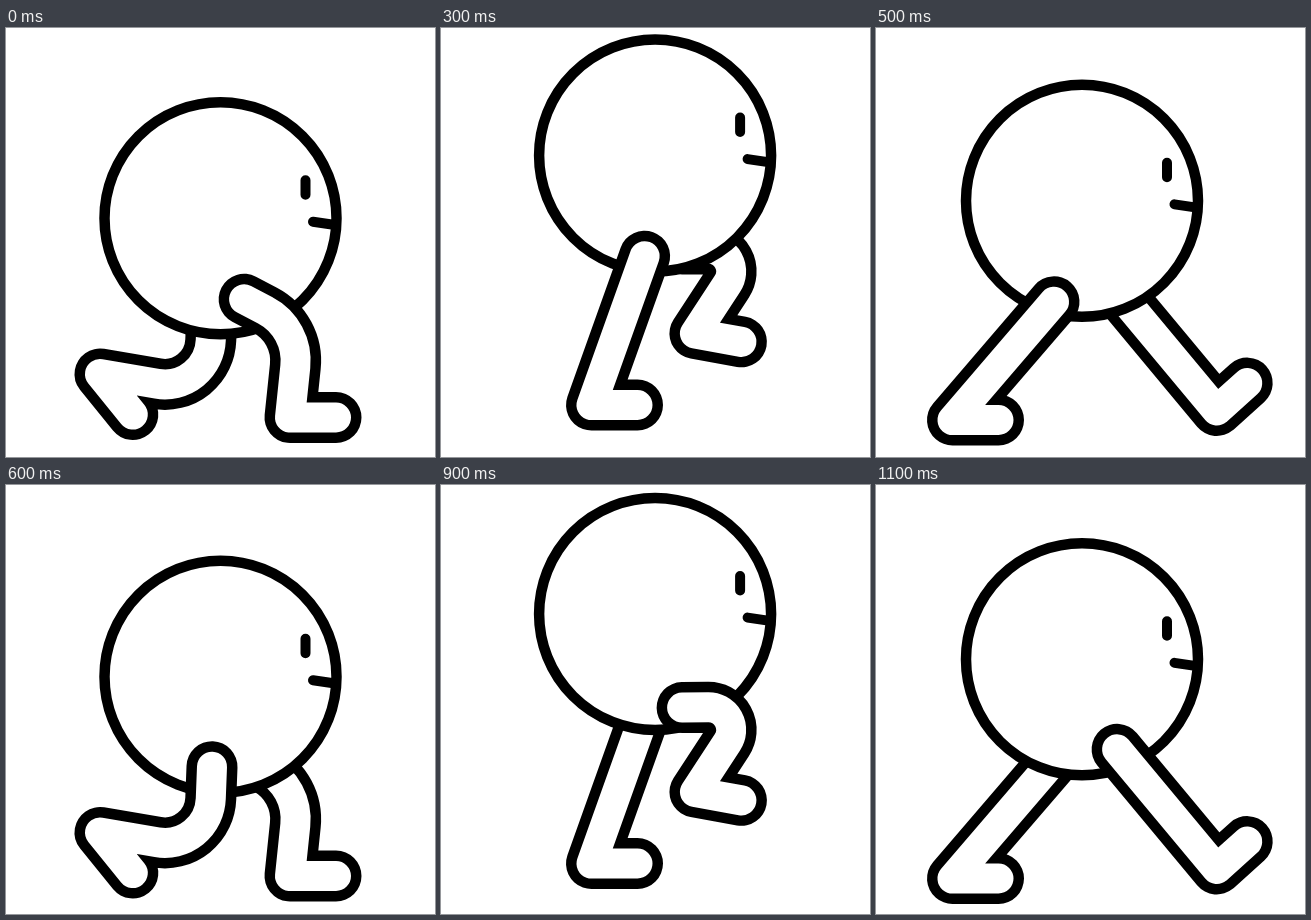
An HTML page with a canvas that plays this animation: 429x429 px, repeating every 1.2 s.

```html
<!DOCTYPE html>
<html lang="en">
<head>
<meta charset="utf-8">
<title>Walking ball</title>
<style>
  html, body { margin: 0; width: 100%; height: 100%; overflow: hidden; background: #fff; }
  canvas { display: block; }
</style>
</head>
<body>
<canvas id="stage" width="429" height="429"></canvas>
<script>
const ctx = document.getElementById('stage').getContext('2d');
const STEP = 100, STEPS = 12, HALF = STEPS / 2;
const RAD = Math.PI / 180;
const { sin, cos, tan, tanh, atan2, hypot, min, max } = Math;

// a + b*t + c*t^2 + ...
const poly = (t, ...coefs) => coefs.reduceRight((sum, c) => sum * t + c, 0);

// The body falls and rebounds once per stride, then leans back at the end
const bodyAt = t => ({
  x: 214.5 - 8.5 * (t / 5) ** 6,
  y: 126.8 + 8.7 * (t - 2.7) ** 2,
});

// Foot flat on the ground, sliding back; the leg straightens
const stance = t => ({
  hip: { x: 209 + 31 * cos(40 * RAD * (t - 0.5)), y: bodyAt(t).y + 91 + 10 * tanh(2 * (t - 2)) },
  heel: { x: poly(t, 284, -49, 1.5), y: 375.5 + 0.5 * t + 14 * (t / 2.5 - 1) ** 6 },
  tilt: 0,
  bend: poly(t, 41, 42, -20),
  split: 0.37 + 0.06 * t,
});

// Foot lifted and thrown forward
const swing = t => ({
  hip: { x: 206 + 38 * sin(22.5 * RAD * t), y: bodyAt(t).y + 90 - 6 * sin(72 * RAD * t) },
  heel: { x: poly(t, 94, 30.6, 13.3, -1.91), y: poly(t, 346, -70.2, 24, -1.7) },
  tilt: poly(t, 51, 56.9, -36.1, 4.2),
  bend: poly(t, 71, 35, -12),
  split: max(0.1, 0.35 - 0.08 * t),
});

function stroke(color, width) {
  ctx.strokeStyle = color;
  ctx.lineWidth = width;
  ctx.stroke();
}

function drawLeg({ hip, heel, tilt, bend, split }) {
  const dx = heel.x - hip.x, dy = heel.y - hip.y, reach = hypot(dx, dy);
  // The knee stands off the hip-heel line by the bend
  const out = max(0, bend), along = split * reach;
  const kneeX = hip.x + dx * split + dy / reach * out;
  const kneeY = hip.y + dy * split - dx / reach * out;
  // Its curve takes up a fixed share of the thigh
  const angle = atan2(along, out) + atan2(reach - along, out);
  const radius = min(90, 0.62 * hypot(along, out) * tan(angle / 2));
  const foot = 46 + 0.12 * tilt;

  ctx.beginPath();
  ctx.moveTo(hip.x, hip.y);
  ctx.arcTo(kneeX, kneeY, heel.x, heel.y, radius);
  ctx.lineTo(heel.x, heel.y);
  ctx.lineTo(heel.x + foot * cos(tilt * RAD), heel.y + foot * sin(tilt * RAD));
  stroke('#000', 51);
  stroke('#fff', 30);
}

function drawBody({ x, y }) {
  ctx.beginPath();
  ctx.arc(x, y, 116, 0, 2 * Math.PI);
  ctx.fillStyle = '#fff';
  ctx.fill();
  stroke('#000', 10.5);

  ctx.beginPath();
  ctx.moveTo(x + 85, y - 38);
  ctx.lineTo(x + 85, y - 23.5);
  ctx.moveTo(x + 92.5, y + 3.5);
  ctx.lineTo(x + 113, y + 6.5);
  stroke('#000', 10);
}

function draw(now) {
  const step = Math.floor((now - start) / STEP) % STEPS;
  const t = step % HALF, first = step < HALF;
  const legs = [swing(t), stance(t)];
  if (!first) legs.reverse();

  ctx.fillStyle = '#fff';
  ctx.fillRect(0, 0, 429, 429);
  ctx.save();
  // The second stride sits slightly lower
  ctx.translate(0, first ? 0 : 1.5);
  drawLeg(legs[0]);
  drawBody(bodyAt(t));
  drawLeg(legs[1]);
  ctx.restore();
}

function loop() {
  draw(performance.now());
  requestAnimationFrame(loop);
}

ctx.lineCap = ctx.lineJoin = 'round';
const start = performance.now();
loop();
</script>
</body>
</html>
```
